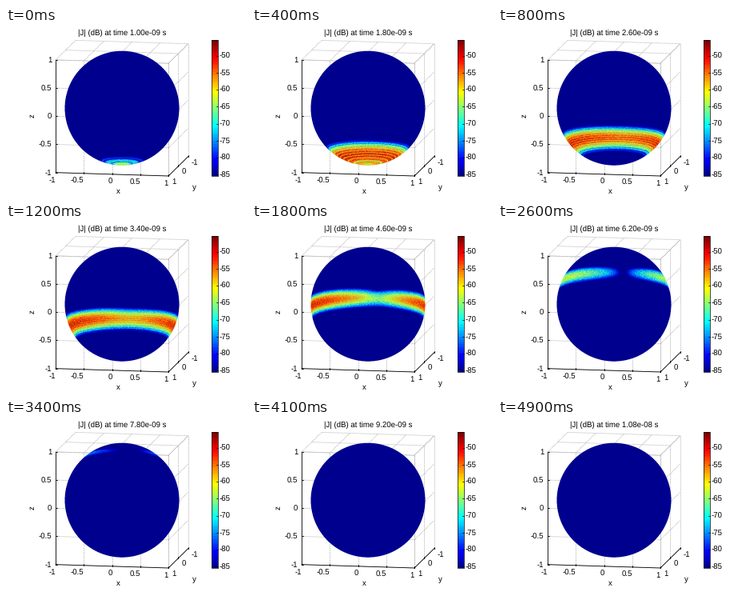
These frames come from a looping animation (300 px wide and 210 px high, 5000 ms). A matplotlib script:

```python
import numpy as np
import matplotlib.pyplot as plt
from matplotlib.animation import FuncAnimation

W, H, DPI = 300, 210, 100
FRAMES, INTERVAL = 50, 100
CX, CY, RADIUS = 145.0, 100.2, 71.5
DB_MIN, DB_MAX = -85.4, -45.4
TILT = np.radians(10)
LEFT, TOP, SIDE, SUB = 73, 28, 144, 4   # sphere patch and samples per pixel

plt.rcParams["font.family"] = "Liberation Sans"
plt.rcParams["font.size"] = 9.7 * 72 / DPI
plt.rcParams["text.hinting"] = "none"

# Orthographic camera, looking slightly up from below
C, S = np.cos(TILT), np.sin(TILT)
RIGHT = np.array([C, -S, 0])
UP = np.array([-S * S, -S * C, C])
TOWARD = np.cross(RIGHT, UP)

fig = plt.figure(figsize=(W / DPI, H / DPI), dpi=DPI, facecolor="white")
ax = fig.add_axes([0, 0, 1, 1])
ax.axis("off")


def project(x, y, z):
    p = np.array([x, y, z])
    return CX + RADIUS * (p @ RIGHT), CY - RADIUS * (p @ UP)


def line(a, b, color="black", lw=0.6, **kw):
    (x0, y0), (x1, y1) = a, b
    ax.plot([x0, x1], [y0, y1], color=color, lw=lw, zorder=1, **kw)


def edge(a, b, **kw):
    line(project(*a), project(*b), **kw)


def label(x, y, text, ha="center", **kw):
    return ax.text(x, y, text, ha=ha, va="center_baseline", zorder=5, **kw)


def jet(level):
    """64-step jet colours for levels in 0..1."""
    step = (np.clip(np.floor(level * 64), 0, 63) + 1) / 64
    return np.stack([np.clip(1.5 - np.abs(4 * step - k), 0, 1)
                     for k in (3, 2, 1)], axis=-1)


def draw_box():
    dots = dict(color="#a8a8a8", lw=0.6, dashes=(1, 1))
    for t in (-1, -0.5, 0, 0.5, 1):
        edge((t, 1, -1), (t, 1, 1), **dots)
        edge((t, 1, 1), (t, -1, 1), **dots)
        edge((-1, 1, t), (1, 1, t), **dots)
        edge((1, 1, t), (1, -1, t), **dots)
    for t in (-1, 0, 1):
        edge((1, t, -1), (1, t, 1), **dots)
        edge((-1, t, 1), (1, t, 1), **dots)

    edge((-1, 1, -1), (-1, 1, 1))
    edge((-1, 1, -1), (1, 1, -1))
    edge((1, 1, -1), (1, -1, -1))

    for t in (-1, -0.5, 0, 0.5, 1):
        x, y = project(t, 1, -1)
        line((x, y), (x, y - 2))
        label(x, y + 8.5, f"{t:g}", "right")
        x, y = project(-1, 1, t)
        line((x, y), (x + 2, y))
        label(x - 5, y, f"{t:g}", "right")
    for t in (1, 0, -1):
        x, y = project(1, t, -1)
        line((x, y), (x, y - 2))
        label(x + 4, y + 6.5, f"{t:g}", "left")

    label(140, 203.5, "x")
    label(235.5, 198, "y")
    label(33.5, 111, "z", rotation=90)


def draw_colorbar():
    left, right, top, bottom = 257, 265, 15, 185
    ramp = jet(np.linspace(1, 0, 170))[:, None, :]
    ax.imshow(ramp, extent=(left, right, bottom, top), aspect="auto",
              interpolation="nearest", zorder=2)
    ax.plot([left, right, right, left, left],
            [top, top, bottom, bottom, top], color="black", lw=0.5, zorder=3)
    for db in range(-85, -49, 5):
        y = top + (DB_MAX - db) / (DB_MAX - DB_MIN) * (bottom - top)
        ax.plot([right - 2, right], [y, y], color="black", lw=0.5, zorder=3)
        label(right + 2, y - 0.3, str(db), "left")


draw_box()
draw_colorbar()

# Unit normal of the sphere under each sample
offset = (np.arange(SIDE * SUB) + 0.5) / SUB
sx, sy = np.meshgrid((LEFT + offset - CX) / RADIUS, (CY - TOP - offset) / RADIUS)
inside = (sx**2 + sy**2 <= 1).astype(float)
depth = np.sqrt(np.clip(1 - sx**2 - sy**2, 0, 1))
nx, ny, nz = (sx * RIGHT[i] + sy * UP[i] + depth * TOWARD[i] for i in range(3))

# The wave runs straight up to the equator, then creeps along the arc
path = np.where(nz > 0, np.arcsin(np.clip(nz, 0, 1)), nz)
lit = np.clip(-nz, 0, 1)
creep = 0.18 * np.exp(-np.clip(nz, 0, 1) / 0.15)
strength = 20 * np.log10(np.sqrt(nx**2 + lit**2 + creep**2) + 1e-6)
strength -= 22 * np.clip(path + 0.1, 0, None)
fringe_depth = np.clip(-1.2 * nz - 0.15, 0, 1)

# Fine mesh ripple, averaged out to a soft speckle
rng = np.random.default_rng(4)
strength += 20 * np.log10(np.cos(rng.random(nz.shape) * np.pi / 2) + 0.15)


def pixel_mean(samples):
    blocks = samples.reshape(SIDE, SUB, SIDE, SUB, -1)
    return blocks.mean(axis=(1, 3))


coverage = pixel_mean(inside)


def current_db(t):
    d = path - (-0.41 + 0.3 * (t - 3.4))
    fringe = 20 * np.log10(np.abs(np.cos(np.pi * d / 0.0325)) + 0.25)
    return (-47.5 - 36.4 * (d / 0.21)**2 + strength
            + fringe_depth * np.minimum(fringe, 0))


def sphere_image(t):
    level = (current_db(t) - DB_MIN) / (DB_MAX - DB_MIN)
    rgb = pixel_mean(jet(level) * inside[..., None])
    return np.dstack([rgb / np.maximum(coverage, 1e-6), coverage])


sphere = ax.imshow(sphere_image(1.0), aspect="auto", interpolation="nearest",
                   extent=(LEFT, LEFT + SIDE, TOP + SIDE, TOP), zorder=4)
title = label(145, 5.5, "")
ax.set_xlim(0, W)
ax.set_ylim(H, 0)


def update(i):
    t = 1 + 0.2 * i
    sphere.set_data(np.clip(sphere_image(t), 0, 1))
    title.set_text(f"|J| (dB) at time {t * 1e-9:.2e} s")
    return sphere, title


anim = FuncAnimation(fig, update, frames=FRAMES, interval=INTERVAL,
                     repeat=True, repeat_delay=0, blit=False)
plt.show()
```
